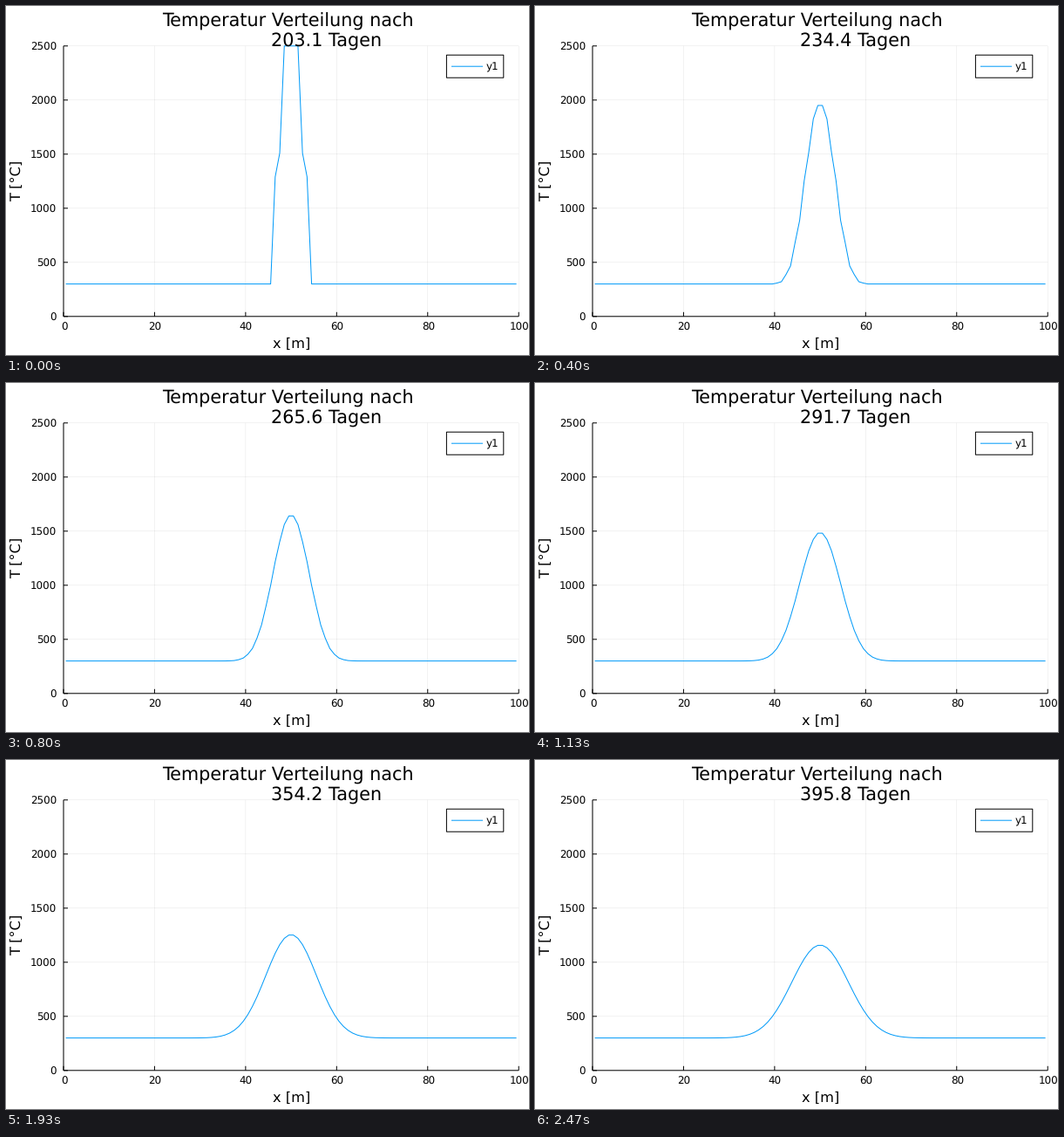
Animation, 600 px wide and 400 px high, one loop 2.54 s. Source, as a matplotlib script:

```python
import numpy as np
import matplotlib.pyplot as plt
from matplotlib.animation import FuncAnimation
from matplotlib.patches import Rectangle

W, H, DPI = 600, 400, 100
PX = 72 / DPI  # points per pixel
LEFT, RIGHT, TOP, BOTTOM = 66, 588.2, 45.8, 355.8
T_MAX, X_MAX = 2500, 100
BLUE = "#009af9"

# Playback: 15 pictures per second on a 10 ms clock
TICK_MS, TICKS, STEPS = 10, 254, 38
DAYS_PER_STEP, FIRST_STEP = 125 / 24, 39

# Explicit heat conduction on 100 cells of 1 m
FOURIER = 0.45
T_COLD, T_HOT = 300, 2500

plt.rcParams["font.family"] = "DejaVu Sans"
plt.rcParams["text.hinting"] = "no_hinting"
plt.rcParams["path.simplify"] = False


def px_x(x):
    return LEFT + (RIGHT - LEFT) * x / X_MAX


def px_y(temp):
    return BOTTOM - (BOTTOM - TOP) * temp / T_MAX


def simulate():
    temp = np.full(100, float(T_COLD))
    temp[47:53] = T_HOT
    history = []
    for _ in range(STEPS):
        temp[1:-1] += FOURIER * (temp[2:] - 2 * temp[1:-1] + temp[:-2])
        history.append(temp.copy())
    return history


fig = plt.figure(figsize=(W / DPI, H / DPI), dpi=DPI, facecolor="white")
ax = fig.add_axes([0, 0, 1, 1])
ax.set_xlim(0, W)
ax.set_ylim(H, 0)
ax.axis("off")


def line(xs, ys, color="black", width=1.0, **kw):
    return ax.plot(xs, ys, color=color, lw=width * PX, snap=False,
                   solid_capstyle="butt", **kw)[0]


def grid(xs, ys):
    line(xs, ys, width=0.5, alpha=0.1, zorder=1)


def label(x, y, text, size, ha="left", va="baseline", **kw):
    return ax.text(x, y, text, fontsize=size * PX, ha=ha, va=va, **kw)


SMALL, MEDIUM, LARGE = 11.85, 16.3, 20.74

for x in range(0, X_MAX + 1, 20):
    grid([px_x(x)] * 2, [TOP, BOTTOM])
    line([px_x(x)] * 2, [BOTTOM - 5, BOTTOM], zorder=3)
    label(px_x(x) + 0.5, 372, str(x), SMALL, ha="center")
for t in range(0, T_MAX + 1, 500):
    grid([LEFT, RIGHT], [px_y(t)] * 2)
    line([LEFT, LEFT + 5], [px_y(t)] * 2, zorder=3)
    label(58, px_y(t) + 5, str(t), SMALL, ha="right")
line([LEFT, RIGHT], [BOTTOM] * 2, zorder=3)
line([LEFT, LEFT], [TOP, BOTTOM], zorder=3)

label(328, 392, "x [m]", MEDIUM, ha="center")
label(20.5, 200, "T [°C]", MEDIUM, ha="right", va="center", rotation=90)
label(179, 24, "Temperatur Verteilung nach", LARGE)
days = label(304, 46, "", LARGE)

ax.add_patch(Rectangle((505.4, 56.2), 65.4, 26, fc="white", ec="black",
                       lw=PX, snap=False, zorder=4))
line([511, 547], [69.2, 69.2], BLUE, zorder=5)
label(551, 74, "y1", SMALL, zorder=5)

cells = px_x(np.arange(100) + 0.5)
history = simulate()
curve = line(cells, px_y(history[0]), BLUE, zorder=2, solid_joinstyle="round")


def draw(tick):
    step = min(int((tick + 0.5) * 0.15), STEPS - 1)
    curve.set_ydata(px_y(history[step]))
    days.set_text(f"{(FIRST_STEP + step) * DAYS_PER_STEP:.1f} Tagen")
    return curve, days


anim = FuncAnimation(fig, draw, frames=TICKS, interval=TICK_MS, repeat=True,
                     repeat_delay=0, blit=False)
plt.show()
```
